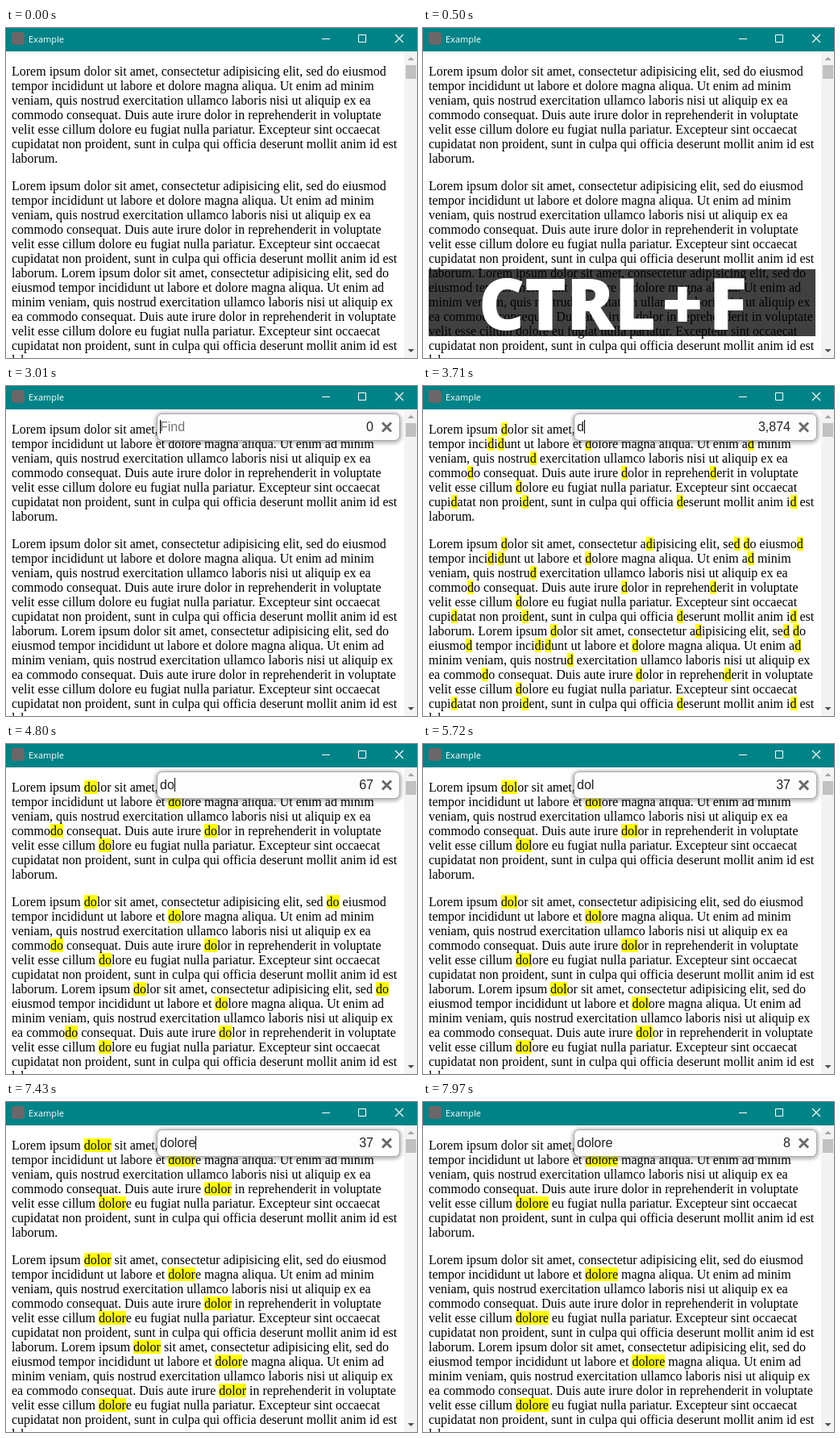
Recreate the animation shown at these times as an HTML page. Size 510 px wide and 409 px high, loop 8 s.

```html
<!DOCTYPE html>
<html lang="en">
<head>
<meta charset="utf-8">
<title>Find in page</title>
<style>
  html, body { margin: 0; width: 100%; height: 100%; overflow: hidden; background: #fff; }
  #win { position: relative; width: 510px; height: 409px; overflow: hidden; }
  #win > *, #find > * { position: absolute; }
  #bar { left: 0; top: 0; width: 510px; height: 29px; background: #008387; }
  #icon { left: 7px; top: 5px; width: 16px; height: 16px; border-radius: 3px; background: #6b6668; }
  #title { left: 28px; top: 4px; font: 11px/20px "Open Sans", sans-serif; color: #fff; }
  #page { left: 7px; top: 29px; width: 481px; font: 16px/18px "Liberation Serif", serif; color: #000; }
  p { margin: 16px 0; }
  mark { background: #ff0; color: inherit; }
  #track { left: 494px; top: 29px; width: 16px; height: 380px; background: #f3f3f3; }
  #thumb { left: 496px; top: 46px; width: 13px; height: 17px; background: #c1c1c1; }
  #find { left: 187px; top: 34px; width: 300px; height: 32px; border: 1px solid #a9a9a9; border-radius: 7px;
    background: #fdfdfd; box-shadow: 0 1px 4px 2px rgba(0, 0, 0, .28); font: 16px/18px "Liberation Sans", sans-serif; color: #222; }
  #typed, #hint { left: 3px; top: 7px; white-space: pre; }
  #hint { color: #757575; }
  #caret { display: inline-block; width: 1px; height: 17px; margin-right: -1px; background: #000; vertical-align: -3px; }
  #count { right: 32px; top: 7px; }
  #keys { left: 7px; top: 299px; width: 480px; height: 83px; box-sizing: border-box; padding-left: 62px;
    background: rgba(0, 0, 0, .75); color: #fff; font: 800 88px/83px "Open Sans", sans-serif; white-space: nowrap; }
  #keys span { margin: 0 8px; }
  svg { left: 0; top: 0; }
</style>
</head>
<body>
<div id="win">
  <div id="page"></div>
  <div id="track"></div>
  <div id="thumb"></div>
  <div id="bar"></div>
  <div id="icon"></div>
  <div id="title">Example</div>
  <svg width="510" height="409" fill="none">
    <path d="M392 13.5h10M437.5 8.5h9v9h-9z" stroke="#fff"/>
    <path d="M483 8l10 10m0-10l-10 10" stroke="#fff" stroke-width="1.1"/>
    <path d="M498.500 40l4-4 4 4z" fill="#a3a3a3"/>
    <path d="M498.500 398l4 4 4-4z" fill="#505050"/>
  </svg>
  <div id="find">
    <div id="hint">Find</div>
    <div id="typed"><span id="text"></span><i id="caret"></i></div>
    <div id="count"></div>
    <svg width="300" height="32" fill="none"><path d="M279 10.500l11 11m0-11l-11 11" stroke="#6a6a6a" stroke-width="3"/></svg>
  </div>
  <div id="keys">CTRL<span>+</span>F</div>
</div>
<script>
const $ = id => document.getElementById(id);
const lorem = 'Lorem ipsum dolor sit amet, consectetur adipisicing elit, sed do eiusmod tempor incididunt ut labore et dolore magna aliqua. ' +
  'Ut enim ad minim veniam, quis nostrud exercitation ullamco laboris nisi ut aliquip ex ea commodo consequat. ' +
  'Duis aute irure dolor in reprehenderit in voluptate velit esse cillum dolore eu fugiat nulla pariatur. ' +
  'Excepteur sint occaecat cupidatat non proident, sunt in culpa qui officia deserunt mollit anim id est laborum.';
const html = `<p>${lorem}</p><q>${lorem} ${lorem}</q>`.replace(/q>/g, 'p>');
const LOOP = 8000, KEYS_AT = 500, FIND_AT = 2000;
const word = 'dolore';
const typeAt = [3410, 4170, 5180, 5950, 6580, 7430];
const matchAt = [3710, 4800, 5340, 6100, 6650, 7510];
const caretOn = [FIND_AT, 3010, ...typeAt];
const caretOff = [2460, 3940, 4880, 5720, 6500, 7130, 7970];
const counts = ['0', '3,874', '67', '37', '37', '37', '8'];

const passed = (times, t) => times.filter(x => x <= t).length;
const latest = (times, t) => Math.max(0, ...times.filter(x => x <= t));
const show = (id, on) => $(id).style.visibility = on ? 'visible' : 'hidden';
let shown = -1;

function highlight(n) {
  if (n === shown) return;
  shown = n;
  const query = word.slice(0, n);
  $('page').innerHTML = n ? html.replaceAll(query, `<mark>${query}</mark>`) : html;
  $('count').textContent = counts[n];
}

function draw(now) {
  const t = now % LOOP, open = t >= FIND_AT, n = passed(typeAt, t);
  show('keys', t >= KEYS_AT && !open);
  show('find', open);
  show('hint', open && !n);
  show('caret', open && latest(caretOn, t) > latest(caretOff, t));
  $('text').textContent = word.slice(0, n);
  highlight(passed(matchAt, t));
  requestAnimationFrame(draw);
}
draw(performance.now());
</script>
</body>
</html>
```
